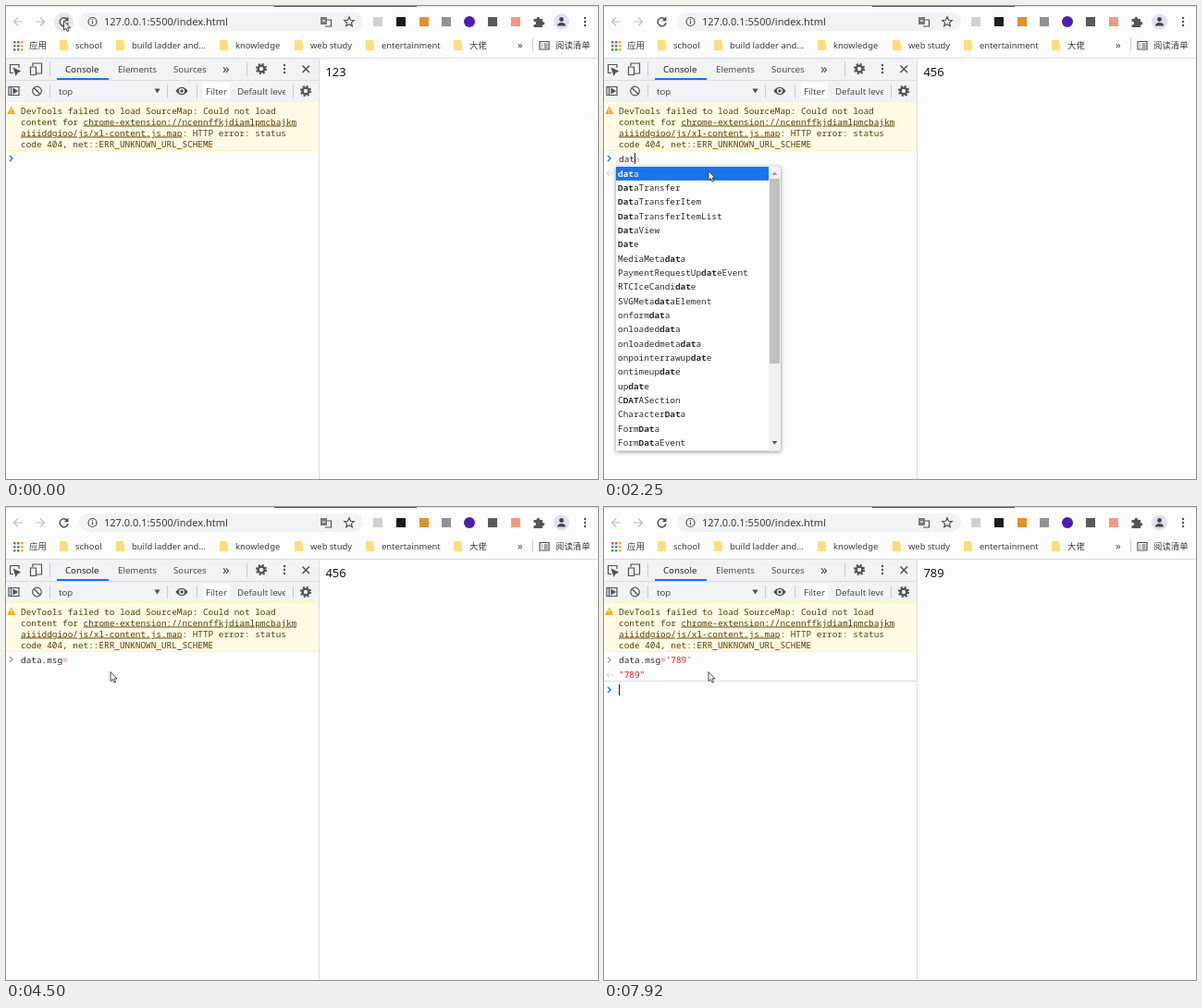
Animation of 640 by 512 pixels, one loop 8 s. Source, as an HTML page:

```html
<!DOCTYPE html>
<html lang="en">
<head>
<meta charset="utf-8">
<title>Console data binding</title>
<style>
html, body { margin: 0; width: 100%; height: 100%; overflow: hidden; background: #fdfdfe; }
svg { display: block; }
text { font: 9.4px "Noto Sans", "Noto Sans CJK SC", "Noto Sans CJK", sans-serif; fill: #3c3c40; white-space: pre; }
.tab { font-size: 9.7px; fill: #4a4a50; }
.mono { font: 9.4px "Noto Sans Mono", monospace; fill: #2b2b2b; }
.warn { fill: #5c3c00; }
.link { text-decoration: underline; }
.page { font-size: 12.9px; fill: #111; }
.line { fill: none; stroke: #505055; stroke-width: 1.2; }
.rule { stroke: #ccccd2; }
.edge { stroke: #dcdce8; }
.popup { filter: drop-shadow(0 1px 2px #0007); }
</style>
</head>
<body>
<svg width="640" height="512" viewBox="0 0 640 512">
  <rect width="640" height="512" fill="#fdfdfe"/>
  <path d="M0 .5H640" stroke="#dee1e6"/>
  <path d="M290 .5H444" stroke="#55555a"/>

  <g class="line">
    <path d="M18 17H8.500m4.500-4.500-4.500 4.500 4.500 4.500M32 17h9.500m-4.500-4.500 4.500 4.500-4.500 4.500" stroke="#c0c0c4"/>
    <rect x="79" y="7" width="307" height="20" rx="10" fill="#f1f3f4" stroke="none"/>
    <circle cx="93.500" cy="17" r="4.500"/>
    <path d="M93.500 16.200v3.300M93.500 14v1.200"/>
    <path d="m371 11.800 1.500 3.500 3.800.3-2.900 2.500.9 3.700-3.300-2-3.300 2 .9-3.700-2.900-2.500 3.800-.3z"/>
    <path d="M347 15h4.500v7H345"/>
    <rect x="340" y="12" width="7" height="8" fill="#77777c" stroke="none"/>
    <path d="M342 16h3" stroke="#fff"/>
  </g>
  <g id="extensions"></g>
  <path d="M570.500 14h3.200a1.700 1.700 0 1 1 3.200 0h3.100v3.200a1.700 1.700 0 1 1 0 3.200V23h-9.500v-3a1.700 1.700 0 1 0 0-3z" fill="#55555a"/>
  <circle cx="600.500" cy="17" r="8.500" fill="#dfe2f0"/>
  <path d="M596 21.500q0-3.500 4.500-3.500t4.500 3.500z" fill="#444450"/>
  <circle cx="600.500" cy="14.500" r="2.400" fill="#444450"/>

  <text x="106" y="21" style="font-size:11px">127.0.0.1:5500/index.html</text>
  <g id="bookmarks"></g>
  <text x="553" y="46" style="font-size:11px">»</text>
  <path class="rule" d="M569.500 35v14"/>
  <path class="line" d="M577 38.500h10v8.500h-10zM579 41h1m1.500 0h4M579 43h1m1.500 0h4M579 45h1m1.500 0h4"/>
  <text x="594" y="46">阅读清单</text>

  <rect y="57" width="338" height="46" fill="#f2f3f4"/>
  <path class="edge" d="M0 56.500H640M0 80.500H338M338.500 57V512"/>
  <path class="rule" d="M47.500 61v15M260.500 61v15M47.500 85v14M174.500 85v14M206.500 85v14M310.500 85v14"/>
  <rect x="55" y="78" width="56" height="2" fill="#1a73e8"/>
  <text class="tab" x="64" y="72" style="fill:#222">Console</text>
  <text class="tab" x="121" y="72">Elements</text>
  <text class="tab" x="181" y="72">Sources</text>
  <text x="234" y="72.500" style="font-size:15px">»</text>
  <text class="tab" x="57" y="95.500">top</text>
  <rect x="213" y="83" width="29" height="17" fill="#fff"/>
  <text class="tab" x="216" y="95.500">Filter</text>
  <svg x="250" y="82" width="52" height="20"><text class="tab" y="13.500">Default levels</text></svg>
  <g class="line">
    <path d="M8 72.500H4.500V63.500h9.500V67"/>
    <path d="m8.500 67.500 2.200 7 1.400-2.600 2.800-1.400z" fill="#505055"/>
    <path d="M29 65v-3h9.500v11H33M26.500 66h6v8.500h-6z"/>
    <path d="m320.500 64.500 7.500 7.500m0-7.500-7.500 7.500" stroke-width="1.500"/>
    <path d="M3 87.500h11v9H3zM5.500 87.500v9"/>
    <path d="m8 89.500 4 2.500-4 2.500z" fill="#505055"/>
    <circle cx="33.500" cy="92" r="4.800"/>
    <path d="m30 88.500 7 7"/>
    <path d="M184 92q6-7.500 12 0-6 7.500-12 0z" fill="#505055"/>
    <circle cx="190" cy="92" r="2.400" fill="#505055" stroke="#fff"/>
    <g id="gears"></g>
  </g>
  <path d="M160.500 89.500h6l-3 5z" fill="#505055"/>
  <g id="dots" fill="#505055"></g>

  <rect y="103" width="338" height="53" fill="#fffbe5"/>
  <path d="M0 103.500H338M0 156.500H338" stroke="#fff5c2"/>
  <path d="M5.700 108.500 10.200 117H1.200z" fill="#f4a91a"/>
  <path d="M5.700 111v3m0 .8v1" stroke="#fff"/>
  <text class="mono warn" x="16" y="116.500">DevTools failed to load SourceMap: Could not load</text>
  <text class="mono warn" x="16" y="128.500">content for <tspan class="link">chrome-extension://ncennffkjdiamlpmcbajkm</tspan></text>
  <text class="mono warn" x="16" y="140.500"><tspan class="link">aiiiddgioo/js/xl-content.js.map</tspan>: HTTP error: status</text>
  <text class="mono warn" x="16" y="152.500">code 404, net::ERR_UNKNOWN_URL_SCHEME</text>

  <g id="live"></g>
</svg>
<script>
const LOOP = 8000, CHAR = 5.64, ROW = 15.35, MAX_ROWS = 20, BLINK = 560;
const BLUE = "#1a73e8", GREY = "#9a9aa0", RED = "#c8281e";
const $ = id => document.getElementById(id);

const globals = `data debug decodeURI decodeURIComponent defaultStatus devicePixelRatio dir dirxml
  dispatchEvent document DataTransfer DataTransferItem DataTransferItemList DataView Date
  MediaMetadata PaymentRequestUpdateEvent RTCIceCandidate SVGMetadataElement onformdata onloadeddata
  onloadedmetadata onpointerrawupdate ontimeupdate update CDATASection CharacterData FormData
  FormDataEvent HTMLDataElement HTMLDataListElement MediaStreamAudioDestinationNode`.split(/\s+/);
const members = `msg _msg __defineGetter__ __defineSetter__ __lookupGetter__ __lookupSetter__ __proto__
  constructor hasOwnProperty isPrototypeOf propertyIsEnumerable toLocaleString toString valueOf`.split(/\s+/);

// [start ms, typed text, caret index, popup open]
const steps = [
  [1420, "", 0], [1670, "d", 1], [1750, "d", 1, true], [1920, "da", 2, true], [2080, "dat", 3, true],
  [2330, "data", 4, true], [2670, "data.", 5], [2830, "data.", 5, true], [3080, "data.m", 6, true],
  [3250, "data.ms", 7, true], [3420, "data.msg", 8, true], [3920, "data.msg=", 9],
  [5330, "data.msg='", 10], [5420, "data.msg=''", 11], [6000, "data.msg=''", 10],
  [6580, "data.msg='7'", 11], [6750, "data.msg='78'", 12], [6920, "data.msg='789'", 13],
  [7170, "data.msg='789'", 14], [7580, "", 0]
];

const rect = (x, y, w, h, fill) => `<rect x="${x}" y="${y}" width="${w}" height="${h}" fill="${fill}"/>`;
const stroke = (d, color, width = 1) => `<path d="${d}" fill="none" stroke="${color}" stroke-width="${width}"/>`;
const mono = (x, y, content, fill = "#2b2b2b") => `<text class="mono" x="${x}" y="${y}" style="fill:${fill}">${content}</text>`;
const span = (content, fill) => `<tspan fill="${fill}">${content}</tspan>`;
const chevron = (y, color) => stroke(`M4 ${y - 3}l3 3-3 3`, color, 1.3);
const returnMark = y => stroke(`M6 ${y - 2.5}l-2.500 2.500 2.500 2.500M8 ${y}h1.500`, "#b4b4ba");

function drawChrome() {
  $("extensions").innerHTML = [[402, "#d0d2cc"], [427, "#1c1c1c"], [452, "#e0902c"], [476, "#8e9498"],
    [526, "#5a5a5e"], [551, "#f09a84"]].map(([x, c]) => rect(x - 5, 12, 10, 10, c)).join("")
    + '<circle cx="501" cy="17" r="6" fill="#4a20b0"/>';
  $("dots").innerHTML = [-4, 0, 4].map(d =>
    `<circle cx="626" cy="${17 + d}" r="1.200"/><circle cx="301" cy="${68 + d}" r="1.200"/>`).join("");
  const apps = ["#e0503c", "#e0503c", "#e8b020", "#48a050", "#4080d0", "#e8b020", "#48a050", "#48a050", "#e8b020"];
  $("bookmarks").innerHTML = apps.map((c, i) => rect(8 + i % 3 * 4, 38 + (i / 3 | 0) * 4, 2.5, 2.5, c)).join("")
    + '<text x="25" y="46">应用</text>'
    + [[57, "school"], [118, "build ladder and..."], [230, "knowledge"], [311, "web study"],
      [388, "entertainment"], [483, "大佬"]].map(([x, label]) =>
      `<path d="M${x + 1} 37h8v4h1v7h-9z" fill="#fbdf7c"/><text x="${x + 18}" y="46">${label}</text>`).join("");
  $("gears").innerHTML = [[276, 68], [324, 92]].map(([x, y]) =>
    `<circle cx="${x}" cy="${y}" r="3.400" stroke-width="2.400"/>
     <circle cx="${x}" cy="${y}" r="5.200" stroke-width="1.800" stroke-dasharray="2.100 2"/>`).join("");
}

function popup(text) {
  const isMember = text.includes(".");
  const query = isMember ? text.slice(5) : text;
  const matches = (isMember ? members : globals).filter(w => w.toLowerCase().includes(query));
  const note = i => isMember && query && i > 1 ? "Object" : "";
  const width = Math.max(...matches.map((w, i) => w.length + note(i).length)) * CHAR + 37;
  const rows = matches.slice(0, MAX_ROWS);
  const height = rows.length * ROW + 1;
  const x = isMember ? 41.7 : 13;
  const top = isMember && query ? 157 - height : 173.5;
  const scrolls = matches.length > MAX_ROWS;
  const right = x + width;

  let out = `<g class="popup">${rect(x, top, width, height, "#fff")}</g>`
    + rect(x, top + .5, width - (scrolls ? 13 : 0), ROW - .5, BLUE);
  rows.forEach((word, i) => {
    const at = word.toLowerCase().indexOf(query), end = at + query.length;
    const y = top + 11 + i * ROW;
    out += mono(x + 2, y, `${word.slice(0, at)}<tspan font-weight="bold">${word.slice(at, end)}</tspan>${word.slice(end)}`,
      i ? "#2b2b2b" : "#fff");
    if (note(i)) out += mono(right - 4 - 6 * CHAR, y, note(i), GREY);
  });
  if (scrolls) {
    const mid = right - 6.5;
    out += rect(right - 13, top, 13, height, "#f1f1f1") + rect(right - 12, 187, 11, 200, "#c1c1c1")
      + `<path d="M${mid - 3} 183h6l-3-3.500z" fill="#999"/><path d="M${mid - 3} 471h6l-3 3.500z" fill="#555"/>`;
  }
  return out;
}

function prompt(text, ghost) {
  const [name, value] = text.split("=");
  return name + (value === undefined ? "" : span("=", "#c86a62") + span(value, RED)) + span(ghost, "#a4a4aa");
}

function consoleInput(t) {
  const step = steps.findLast(s => s[0] <= t);
  if (!step) return chevron(165, BLUE);
  const [start, text, caret, open] = step;
  const done = t >= 7580, shift = done ? 33 : 0;
  const ghost = open && !text.endsWith(".") ? (text.includes(".") ? "data.msg" : "data").slice(text.length) : "";
  let out = "";
  if (done) {
    out += chevron(165.5, GREY) + mono(16, 168.800, prompt("data.msg='789'", ""));
    out += returnMark(182) + mono(16, 185.300, '"789"', RED);
    out += '<path class="edge" d="M0 188.500H338"/>';
  }
  out += chevron(165 + shift, text === "data.msg=" ? GREY : BLUE) + mono(16, 168.500 + shift, prompt(text, ghost));
  if (open && text !== "data.") {
    out += returnMark(181);
    if (text.includes(".")) out += mono(16, 184.500, '"456"', "#e0968e");
  }
  if (open) out += popup(text);
  if (Math.floor((t - start) / BLINK) % 2 === 0)
    out += rect(16 + caret * CHAR, 159 + shift, 1, 12, "#222");
  return out;
}

function reload(t) {
  const hover = t < 920 ? '<circle cx="62.500" cy="17.500" r="10.500" fill="#e8e9ec"/>' : "";
  if (t >= 80 && t < 250) return hover + stroke("M58.500 13l8 8m0-8-8 8", "#505055", 1.5);
  return hover + stroke("M66.200 14.500a4.500 4.500 0 1 0 .8 3.800", "#505055", 1.5)
    + '<path d="M67.500 11.500v4.800h-4.800z" fill="#505055"/>';
}

function pointer(t) {
  const p = Math.min(1, Math.max(0, (t - 830) / 590));
  const e = p * p * (3 - 2 * p);
  return `<path transform="translate(${62.5 + 50.5 * e} ${16 + 162.5 * e})"
    d="M0 0v10l2.300-2 1.700 3.600 1.600-.7-1.600-3.500h3z" fill="#fff" stroke="#333" stroke-width=".9"/>`;
}

function draw(t) {
  const value = t < 670 ? 123 : t < 7670 ? 456 : 789;
  $("live").innerHTML = reload(t) + `<text class="page" x="345.500" y="76">${value}</text>`
    + consoleInput(t) + pointer(t);
}

let shown = -1;
function tick() {
  const step = Math.floor((performance.now() % LOOP + 4) * .012);
  if (step !== shown) draw((shown = step) * 1000 / 12 + 1);
  requestAnimationFrame(tick);
}
drawChrome();
tick();
</script>
</body>
</html>
```
